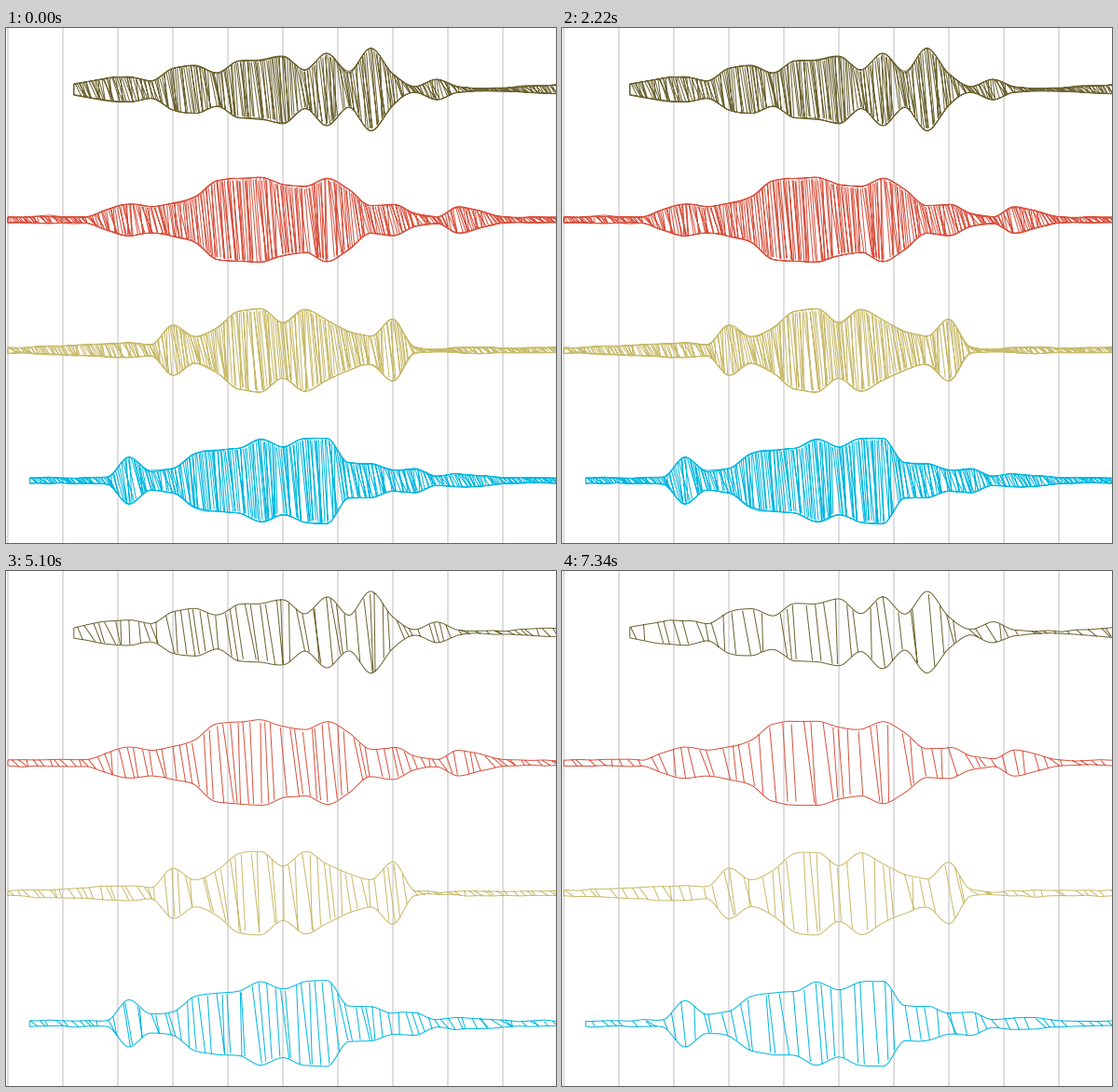
Animation of 590x553 px, one loop 8 s. Source, as a matplotlib script:

```python
import numpy as np
import matplotlib.pyplot as plt
from matplotlib.animation import FuncAnimation
from matplotlib.patches import PathPatch
from matplotlib.path import Path

W, H, DPI = 590, 553, 64
PX = 72 / DPI              # one pixel in points
TICK = 59                  # grid spacing
STEP = 23.6                # spacing of the data points
KNOTS = 13.8 + STEP * np.arange(26)
INTERVAL, FRAMES = 20, 400

# colour, centre line, left end, half heights at the knots
STREAMS = [
    ("#6c6331", 66, 72.8,
     [3, 3, 4, 8, 12, 13.5, 9.5, 22.5, 25.5, 18, 30.5, 31.5, 36, 20.5, 38.5,
      19, 44, 17, 3, 11, 3, 1.5, 1.5, 3.2, 4.5, 5]),
    ("#d8523f", 206, 2,
     [3.5, 3.5, 3.5, 3.5, 11, 17, 14, 18, 24, 42, 44.5, 45.5, 38.5, 35.5, 44.5,
      32, 15, 17, 7, 4, 14, 9, 3.5, 2.5, 2.5, 3]),
    ("#c8ba69", 346, 2,
     [3, 4, 5, 6, 7.5, 8, 6, 27, 14.5, 24, 42, 44.5, 30, 44, 32,
      21, 15, 33, 3, 1, 2.5, 3, 2.5, 2.5, 2.8, 3]),
    ("#00b7e0", 486, 25.6,
     [3, 3, 3, 3, 4, 25, 10, 13, 29, 33, 34.5, 44.5, 36.5, 45, 46,
      19, 18.5, 11.5, 12.5, 4.5, 6.5, 5.5, 3.5, 3, 2.5, 3]),
]

# start time in ms, hatch spacing, outline passes
SCENES = [(0, 1.9, 2), (3000, 4.6, 1), (5100, 7.8, 1), (7340, 10.8, 1)]


def monotone(x, heights):
    """Monotone cubic through the knots, flat at every peak and dip."""
    y = np.asarray(heights, float)
    d = np.diff(y) / STEP
    a, b = d[:-1], d[1:]
    m = np.zeros_like(y)
    m[1:-1] = (np.sign(a) + np.sign(b)) * np.minimum(
        np.minimum(abs(a), abs(b)), abs(a + b) / 4)
    x = np.clip(x, KNOTS[0], KNOTS[-1])
    i = np.clip(((x - KNOTS[0]) / STEP).astype(int), 0, len(y) - 2)
    t = (x - KNOTS[i]) / STEP
    return (y[i] * (1 + 2 * t) * (1 - t) ** 2 + y[i + 1] * t * t * (3 - 2 * t)
            + STEP * t * (1 - t) * (m[i] * (1 - t) - m[i + 1] * t))


def wobble(x, rng, amp=0.5):
    nodes = np.arange(-10, W + 30, 14)
    return np.interp(x, nodes, rng.normal(0, amp, len(nodes)))


def outline(centre, left, heights, rng):
    x = np.arange(left, W + 4, 2.0)
    h = monotone(x, heights)
    top = np.column_stack([x, centre - h + wobble(x, rng)])
    low = np.column_stack([x, centre + h + wobble(x, rng)])
    ring = np.vstack([top, low[::-1]])
    return Path(np.vstack([ring, ring[:1]]))


def hatching(centre, left, heights, gap, rng):
    x0 = np.arange(left + gap / 2, W + 4, gap)
    n = len(x0)
    x0 = np.maximum(x0 + rng.uniform(-0.45, 0.45, n) * gap, left)
    x1 = x0 + np.clip(rng.normal(6, 2.6, n), 1, 12)
    y0 = centre - monotone(x0, heights) * (1 - rng.uniform(0, 0.07, n))
    y1 = centre + monotone(x1, heights) * (1 - rng.uniform(0, 0.07, n))
    points = np.column_stack([x0, y0, x1, y1]).reshape(-1, 2)
    return Path(points, np.tile([Path.MOVETO, Path.LINETO], n))


def build_scene(ax, gap, passes, seed):
    rng = np.random.default_rng(seed)
    artists = []
    for colour, centre, left, heights in STREAMS:
        paths = [outline(centre, left, heights, rng) for _ in range(passes)]
        paths.append(hatching(centre, left, heights, gap, rng))
        shape = PathPatch(Path.make_compound_path(*paths), fill=False,
                          ec=colour, lw=PX, snap=False, zorder=2)
        artists.append(ax.add_patch(shape))
    return artists


fig = plt.figure(figsize=(W / DPI, H / DPI), dpi=DPI, facecolor="white")
ax = fig.add_axes([0, 0, 1, 1])
ax.set(xlim=(0, W), ylim=(H, 0))
ax.axis("off")

for x in range(2, W, TICK):
    ax.plot([x, x], [0, H], color="#d4d4d4", lw=1.5 * PX, snap=False, zorder=1)

scenes = [build_scene(ax, gap, passes, 11 + k)
          for k, (_, gap, passes) in enumerate(SCENES)]


def update(frame):
    now = frame * INTERVAL
    current = sum(now >= start for start, _, _ in SCENES) - 1
    for k, artists in enumerate(scenes):
        for artist in artists:
            artist.set_visible(k == current)
    return sum(scenes, [])


anim = FuncAnimation(fig, update, frames=FRAMES, interval=INTERVAL,
                     repeat=True, repeat_delay=0, blit=False)
plt.show()
```
